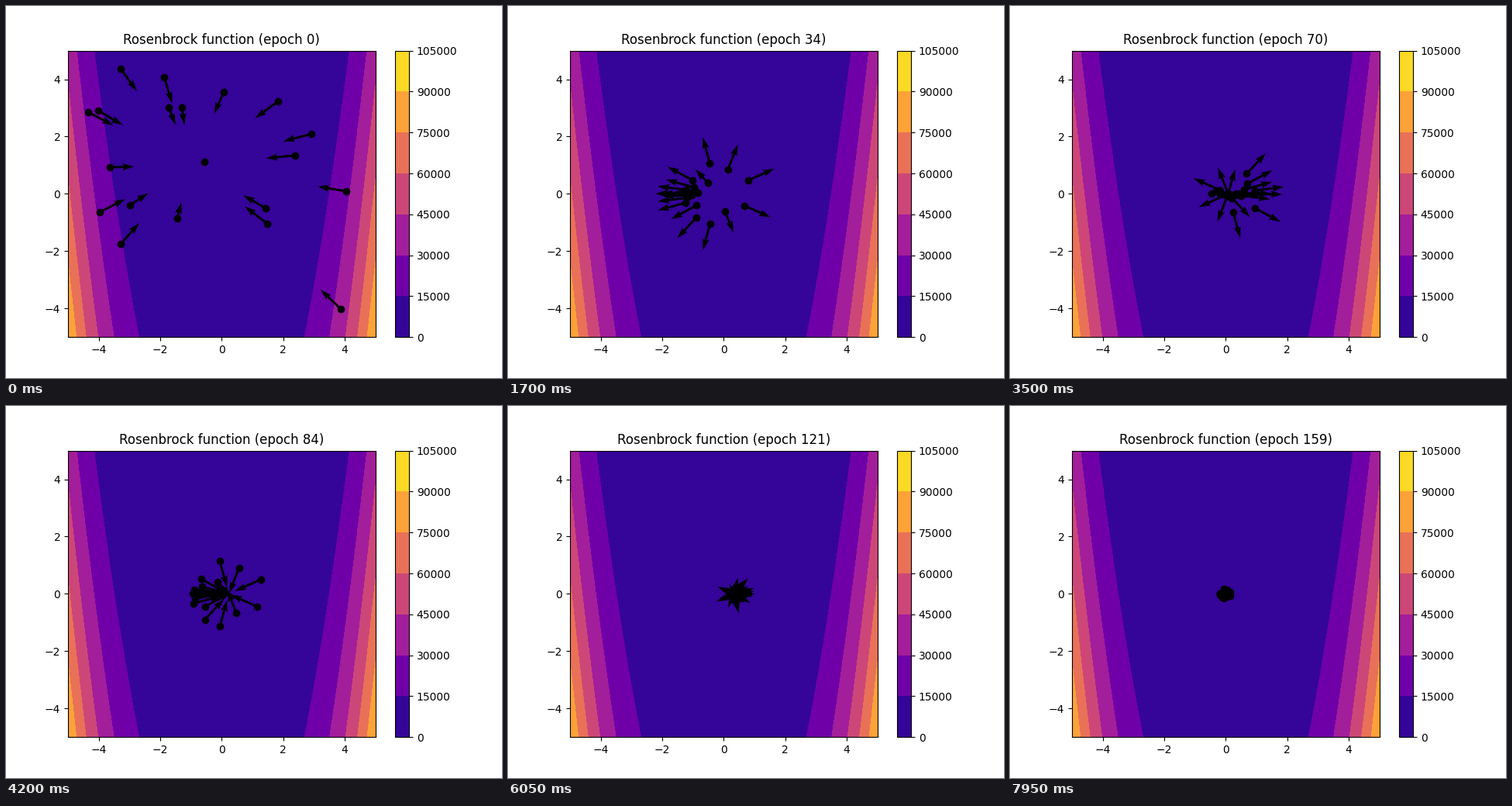
A matplotlib script that plays this animation: 640x480 px, repeating every 8 s.

```python
import numpy as np
import matplotlib.pyplot as plt
from matplotlib.animation import FuncAnimation

FRAMES, INTERVAL = 160, 50
MAX_SPEED = 0.95
SETTLE = 9  # frames until the scattered swarm has joined the pulse

# Opening positions
start = np.array([
    (-3.29, 4.37), (-1.87, 4.07), (0.07, 3.56), (1.83, 3.23), (-4.35, 2.85),
    (-4.02, 2.91), (-1.72, 3.01), (-1.30, 3.01), (2.91, 2.09), (2.38, 1.34),
    (-3.64, 0.93), (-0.56, 1.12), (4.05, 0.09), (-3.97, -0.64), (-2.98, -0.39),
    (-1.45, -0.85), (-3.29, -1.75), (1.43, -0.50), (1.48, -1.04), (3.87, -4.02)])
heading = np.arctan2(start[:, 1], start[:, 0]) % (2 * np.pi)
start = start[np.argsort(heading)]
first_goal = np.array([-1, 1])

# The swarm swings through its centre along rays that crowd to the left
rng = np.random.default_rng(4)
count = len(start)
u = np.linspace(-0.95, 0.95, count)
angle = np.pi * (1 + u ** 3)
rays = np.column_stack((np.cos(angle), np.sin(angle)))
rays *= 1.1 * rng.random((count, 1)) ** 0.3
jitter = rng.normal(0, 0.45, count)

# Key points of the pulse: (frame, turns) and (frame, reach)
TURNS = np.array([(0, -4.6), (34, 0.14), (53, 2.25), (84, 6.42), (97, 7.62), (159, 15.25)])
REACH = np.array([(0, 1.2), (20, 1.7), (34, 1.3), (53, 1), (74, 2), (90, 2.4),
                  (97, 1.5), (121, 0.45), (132, 1.1), (159, 0.17)])


def center(n):
    return np.array([0.08 - 0.27 * np.cos(2 * np.pi * (n - 30) / FRAMES), 0])


def positions(n):
    spread = jitter * np.sin(np.pi * (n - 34) / 50) ** 2
    swing = np.sin(2 * np.pi * np.interp(n, *TURNS.T) + spread)
    swarm = center(n) + rays * (np.interp(n, *REACH.T) * swing)[:, None]
    mix = min(n / SETTLE, 1)
    return (1 - mix) * start + mix * swarm


def velocities(n):
    if n == 0:
        v = 0.3 * (first_goal - start)
    else:
        v = 1.2 * (positions(n) - positions(n - 1))
    speed = np.maximum(np.hypot(*v.T), 1e-9)
    return v * np.minimum(1, MAX_SPEED / speed)[:, None]


fig, ax = plt.subplots(figsize=(6.4, 4.8), dpi=100)
axis = np.linspace(-5, 5, 200)
X, Y = np.meshgrid(axis, axis)
field = ax.contourf(X, Y, (1 - X) ** 2 + 100 * (Y - X ** 2) ** 2, cmap="plasma")
fig.colorbar(field)

dots, = ax.plot(*start.T, "ko")
arrows = ax.quiver(*start.T, *velocities(0).T, color="k", angles="xy",
                   scale_units="xy", scale=1, zorder=3)
ax.set(xlim=(-5, 5), ylim=(-5, 5))
title = ax.set_title("Rosenbrock function (epoch 0)")


def update(n):
    p = positions(n)
    dots.set_data(*p.T)
    arrows.set_offsets(p)
    arrows.XY = p  # keeps arrow angles tied to the moved bases
    arrows.set_UVC(*velocities(n).T)
    title.set_text(f"Rosenbrock function (epoch {n})")
    return dots, arrows, title


anim = FuncAnimation(fig, update, frames=FRAMES, interval=INTERVAL,
                     repeat=True, repeat_delay=0)
plt.show()
```
